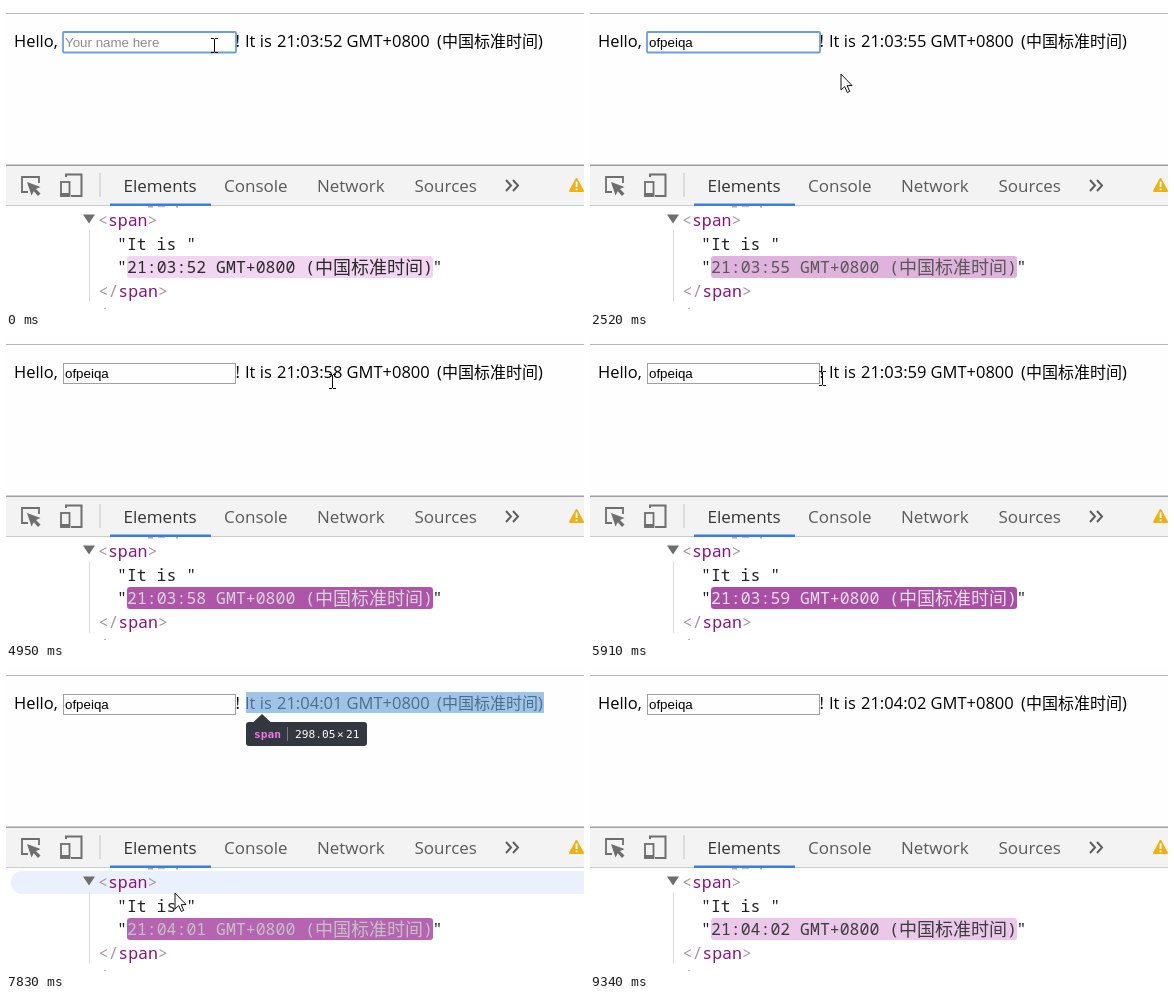
An HTML page with a canvas that plays this animation: 578 px wide and 303 px high, repeating every 9560 ms.

```html
<!DOCTYPE html>
<html lang="zh">
<head>
<meta charset="utf-8">
<title>Clock in the inspector</title>
<style>
html, body { margin: 0; width: 100%; height: 100%; overflow: hidden; background: #fff; }
canvas { display: block; width: 578px; height: 303px; }
</style>
</head>
<body>
<canvas id="stage"></canvas>
<script>
const W = 578, H = 303, LOOP = 9560;
const canvas = document.getElementById('stage');
const ctx = canvas.getContext('2d');
const dpr = window.devicePixelRatio || 1;
canvas.width = W * dpr;
canvas.height = H * dpr;

const PAGE = '16.5px "Open Sans", "Noto Sans", sans-serif';
const PAGE_CJK = '16px "Noto Sans CJK SC", "Noto Sans CJK", sans-serif';
const TAB = '17px "Open Sans", "Noto Sans", sans-serif';
const FIELD = '13.33px "Liberation Sans", Arial, sans-serif';
const CODE = '16.5px "Noto Sans Mono", monospace';
const CODE_CJK = '300 18px "Noto Sans CJK SC", "Noto Sans CJK", sans-serif';
const TIP = '11.2px "DejaVu Sans Mono", monospace';
const ZONE = '中国标准时间';
const NAME = 'ofpeiqa';

const RUNS = [[120, 1050], [1170, 2100], [2250, 3210], [3330, 4260], [4410, 5370],
  [5490, 6450], [6570, 7560], [7680, 8680], [8830, 9340]];
const STEPS = [0];
RUNS.forEach(([a, b], i) => {
  const n = i === RUNS.length - 1 ? 4 : 7;
  for (let k = 0; k <= n; k++) {
    STEPS.push(k === n ? b : a + Math.round((b - a) * k / n / 30) * 30);
  }
});

const TICKS = [-850, 110, 1040, 2010, 2950, 3860, 4780, 5770, 6740, 7615, 8670];
const KEYS = [770, 1040, 1160, 1420, 1560, 1700, 1950];
const MOUSE = [[0, 208, 39], [2180, 208, 39], [2520, 251, 68], [3330, 254, 72],
  [4260, 326, 44], [5490, 326, 44], [6400, 122, 37], [6570, 62, 38], [6720, 5, 41],
  [6850, 5, 41], [7200, 40, 75], [7560, 110, 150], [7680, 150, 207], [7830, 169, 225],
  [8100, 176, 255], [8400, 182, 276]];
const MOUSE_GONE = 8450;

const mix = (a, b, p) => a + (b - a) * p;
const blend = (a, b, p) => `rgb(${a.map((v, i) => Math.round(mix(v, b[i], p)))})`;

function ease(x) {
  if (x >= 1) return 1;
  let lo = 0, hi = 1;
  for (let i = 0; i < 24; i++) {
    const s = (lo + hi) / 2, r = 1 - s;
    if (0.75 * r * r * s + 0.75 * r * s * s + s * s * s < x) lo = s; else hi = s;
  }
  const r = 1 - lo;
  return 0.3 * r * r * lo + 3 * r * lo * lo + lo ** 3;
}

function mouseAt(t) {
  if (t > MOUSE_GONE) return null;
  let i = 0;
  while (i < MOUSE.length - 2 && t > MOUSE[i + 1][0]) i++;
  const [t0, x0, y0] = MOUSE[i], [t1, x1, y1] = MOUSE[i + 1];
  const p = Math.min(1, (t - t0) / (t1 - t0));
  return { x: mix(x0, x1, p), y: mix(y0, y1, p) };
}

function text(s, x, y, font, color) {
  ctx.font = font;
  ctx.fillStyle = color;
  ctx.fillText(s, x, y);
}

function rect(x, y, w, h, color) {
  ctx.fillStyle = color;
  ctx.fillRect(x, y, w, h);
}

function path(points, close) {
  ctx.beginPath();
  points.forEach(([x, y]) => ctx.lineTo(x, y));
  if (close) ctx.closePath();
}

function fillPath(points, color) {
  path(points, true);
  ctx.fillStyle = color;
  ctx.fill();
}

function strokePath(points, color, width) {
  path(points, false);
  ctx.strokeStyle = color;
  ctx.lineWidth = width;
  ctx.stroke();
}

function round(x, y, w, h, r, color) {
  ctx.beginPath();
  ctx.roundRect(x, y, w, h, r);
  ctx.fillStyle = color;
  ctx.fill();
}

function drawField(t, mouse) {
  const focused = t < 2800 || (t > 6500 && t < 7050);
  const count = KEYS.filter(k => k <= t).length;
  const value = NAME.slice(0, count);
  if (focused) {
    ctx.beginPath();
    ctx.roundRect(57, 26, 173, 20.5, 1);
    ctx.strokeStyle = '#6a9fdc';
    ctx.lineWidth = 1.8;
    ctx.stroke();
  } else {
    ctx.strokeStyle = '#a0a0a0';
    ctx.lineWidth = 1;
    ctx.strokeRect(57.5, 26.5, 172, 20);
  }
  if (!count) {
    text('Your name here', 59, 41, FIELD, '#8c8c8c');
    return;
  }
  text(value, 59, 41, FIELD, '#000');
  const end = 59 + ctx.measureText(value).width;
  if (focused && t < 2800) {
    const since = t - KEYS[count - 1];
    if (Math.floor(since / 530) % 2 === 0) rect(Math.round(end), 30, 1, 14, '#000');
  }
  if (focused && t > 6500) {
    const left = t < 6700 ? Math.max(59, Math.min(end, mouse.x)) : 59;
    ctx.save();
    ctx.beginPath();
    ctx.rect(left, 29, end - left, 15);
    ctx.clip();
    rect(left, 29, end - left, 15, '#3390ff');
    text(value, 59, 41, FIELD, '#fff');
    ctx.restore();
    const wave = [];
    for (let x = 59; x <= end; x += 2) wave.push([x, x % 4 === 3 ? 43.5 : 41.8]);
    strokePath(wave, '#e0364c', 1.2);
  }
}

function drawPage(t, clock, mouse) {
  rect(0, 7, W, 1, '#b8b8b8');
  text('Hello,', 8, 41, PAGE, '#000');
  drawField(t, mouse);
  text('!', 229.5, 41, PAGE, '#000');
  text('It is', 239, 41, PAGE, '#000');
  text(clock, 271, 41, PAGE, '#000');
  text('GMT+0800', 340.5, 41, PAGE, '#000');
  text('(', 431, 41, PAGE, '#000');
  text(ZONE, 436, 41, PAGE_CJK, '#000');
  text(')', 532, 41, PAGE, '#000');
}

function drawOverlay() {
  rect(240, 24, 298, 21, 'rgba(111,168,220,.66)');
  fillPath([[247, 54.5], [256, 46], [265, 54.5]], '#333740');
  round(240, 54, 121, 24, 3, '#333740');
  text('span', 248, 70, 'bold ' + TIP, '#ee78e6');
  rect(281, 59, 1, 14, '#777b84');
  text('298.05', 289, 70, TIP, '#fff');
  text('×', 331, 70, TIP, '#fff');
  text('21', 340, 70, TIP, '#fff');
}

function drawToolbar() {
  rect(0, 159, W, 41, '#f3f3f3');
  rect(0, 158.5, W, 1.5, '#a0a0a0');
  rect(0, 199, W, 1, '#cccccc');
  rect(104, 197.5, 101, 2.5, '#3b7de0');

  // inspect icon
  strokePath([[22, 186], [16, 186], [16, 171], [33, 171], [33, 177]], '#6e6e6e', 1.8);
  fillPath([[21, 176], [34.5, 181], [30, 183], [34.5, 187.5], [32, 190], [27.8, 185.3], [25.5, 189.5]], '#6e6e6e');

  // device icon
  strokePath([[60, 171], [60, 168.5], [75.5, 168.5], [75.5, 190], [65, 190]], '#6e6e6e', 2);
  ctx.lineWidth = 1.8;
  ctx.strokeRect(55, 176, 8.5, 14);
  rect(54, 187, 10, 3.5, '#6e6e6e');

  rect(93.5, 167, 1, 24, '#c4c4c4');
  [['Elements', 117.5, '#333'], ['Console', 218, '#5a5a5a'],
    ['Network', 311, '#5a5a5a'], ['Sources', 408.5, '#5a5a5a']]
    .forEach(([s, x, c]) => text(s, x, 186, TAB, c));
  for (const x of [500, 507]) strokePath([[x, 174], [x + 5, 179.5], [x, 185]], '#5f5f5f', 2);

  ctx.lineJoin = 'round';
  path([[570.5, 173], [577, 185], [564, 185]], true);
  ctx.fillStyle = ctx.strokeStyle = '#edb112';
  ctx.lineWidth = 2;
  ctx.fill();
  ctx.stroke();
  ctx.lineJoin = 'miter';
  rect(569.7, 175.5, 1.8, 5.5, '#fff');
  rect(569.7, 182.5, 1.8, 1.8, '#fff');
}

function tag(open, x, y) {
  const cw = 9.9, pale = '#a894a6';
  text(open, x, y, CODE, pale);
  text('span', x + open.length * cw, y, CODE, '#881280');
  text('>', x + (open.length + 4) * cw, y, CODE, pale);
}

function drawTree(age, clock, row) {
  rect(0, 200, W, 103, '#fff');
  if (row >= 0) round(5, 203 + row * 23.2, W, 23, [11, 0, 0, 11], '#eaf1fd');
  rect(142, 200, 5, 1.5, '#b9a3b8');
  rect(152, 200, 7, 1.2, '#c9bcc9');
  rect(170, 200, 2, 1.5, '#b9a3b8');
  rect(83, 224, 1, 72, '#dcdcdc');
  fillPath([[77, 208.5], [89, 208.5], [83, 217.5]], '#6e6e6e');
  tag('<', 92, 220);
  text('"It is "', 111, 244, CODE, '#222');

  const p = ease(age / 1120);
  round(121, 250, 306, 22, 3, blend([158, 54, 153], [245, 219, 244], p));
  const ink = blend([255, 255, 255], [34, 34, 34], p);
  text('"', 111, 267, CODE, '#222');
  text(clock + ' GMT+0800 (', 121, 267, CODE, ink);
  text(ZONE, 309, 267.5, CODE_CJK, ink);
  text(')', 417, 267, CODE, ink);
  text('"', 426.5, 267, CODE, '#222');
  tag('</', 92.5, 291);
  text('</', 82, 314, CODE, '#a894a6');
}

function drawMouse({ x, y }) {
  const overText = x > 8 && x < 538 && y > 24 && y < 47;
  if (overText) {
    x = Math.round(x);
    y = Math.round(y);
    rect(x, y - 6, 1, 13, '#000');
    for (const dy of [-7, 7]) {
      rect(x - 3, y + dy, 3, 1, '#000');
      rect(x + 1, y + dy, 3, 1, '#000');
    }
    return;
  }
  const shape = [[0, 0], [0, 16], [3.7, 12.6], [6.3, 18.5], [8.7, 17.4], [6.2, 11.7], [11, 11.5]]
    .map(([a, b]) => [x + a, y + b]);
  fillPath(shape, '#fff');
  ctx.strokeStyle = '#111';
  ctx.lineWidth = 1;
  ctx.stroke();
}

function draw(now) {
  const raw = now % LOOP;
  const t = STEPS.filter(s => s <= raw).pop();
  const n = TICKS.filter(s => s <= t).length - 1;
  const sec = 3 * 60 + 52 + n;
  const two = v => String(v).padStart(2, '0');
  const clock = `21:${two(Math.floor(sec / 60))}:${two(sec % 60)}`;
  const mouse = mouseAt(t);
  const row = mouse && mouse.y > 203 ? Math.min(3, Math.floor((mouse.y - 203) / 23.2)) : -1;

  ctx.setTransform(dpr, 0, 0, dpr, 0, 0);
  rect(0, 0, W, H, '#fefefe');
  drawPage(t, clock, mouse);
  if (row >= 0) drawOverlay();
  drawTree(t - TICKS[n], clock, row);
  drawToolbar();
  if (mouse) drawMouse(mouse);
}

let start = null;
function loop(now) {
  if (start === null) start = now;
  draw(now - start);
  requestAnimationFrame(loop);
}
draw(0);
requestAnimationFrame(loop);
</script>
</body>
</html>
```
